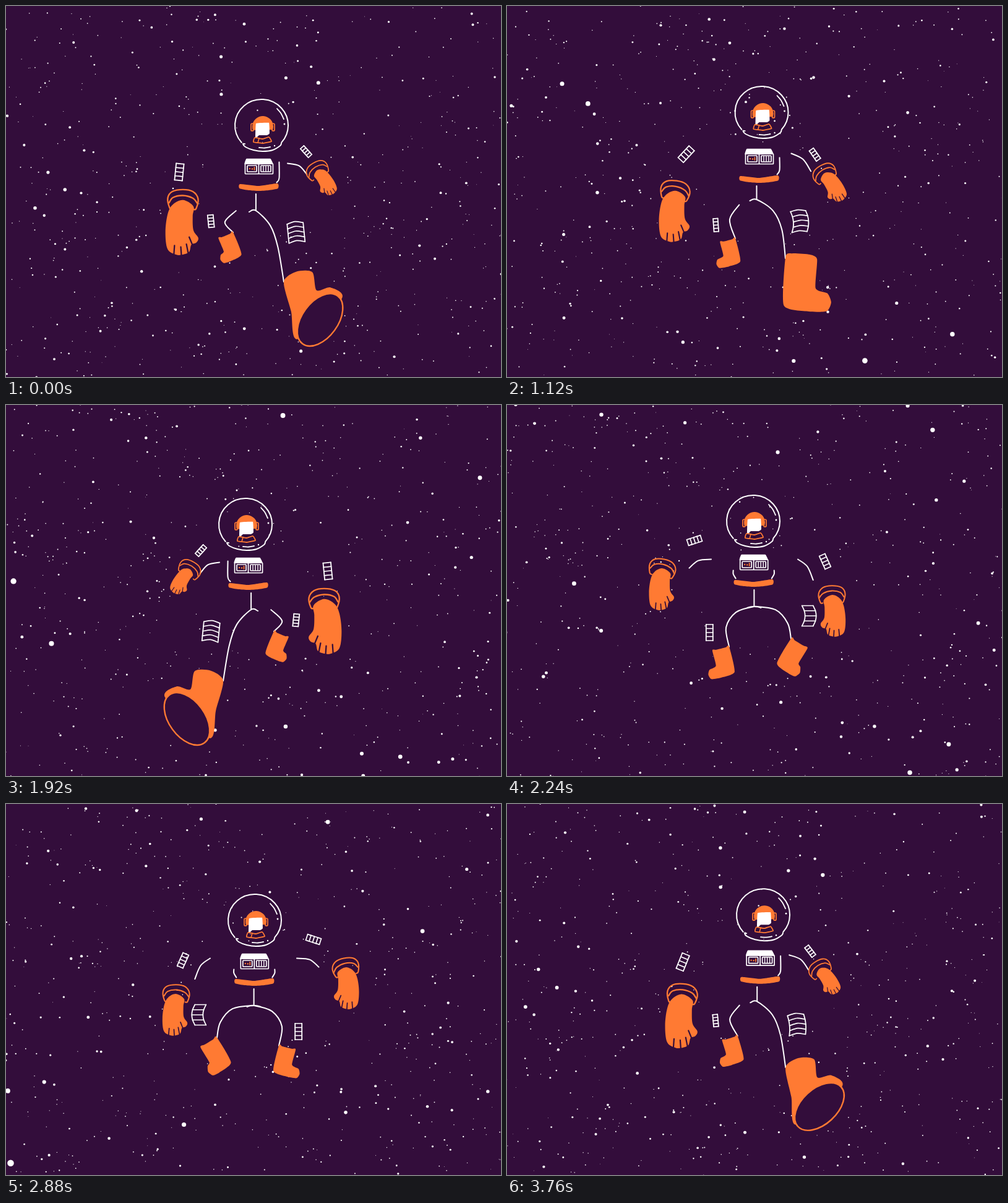
Animation, 800 px wide and 600 px high, one loop 3840 ms. Source, as an HTML page with a canvas:

```html
<!DOCTYPE html>
<html lang="en">
<head>
<meta charset="utf-8">
<title>Space walk</title>
<style>
html, body { margin: 0; width: 100%; height: 100%; overflow: hidden; background: #330d3b; }
canvas { display: block; }
</style>
</head>
<body>
<canvas id="stage" width="800" height="600"></canvas>
<script>
const ctx = document.getElementById('stage').getContext('2d');
const SPACE = '#330d3b', ORANGE = '#ff7a33', WHITE = '#fff';
const STEP = 80, STEPS = 48, CYCLE = 16;

// Motion helpers: one walk cycle lasts 16 phases
const mix = (a, b, t) => a + (b - a) * t;
const angle = phase => phase * 2 * Math.PI / CYCLE;

// Sum of harmonics; pairs are cosine and sine amounts
function wave(phase, mean, ...pairs) {
  const turn = angle(phase);
  return pairs.reduce((sum, amount, i) => {
    const k = Math.floor(i / 2) + 1;
    return sum + amount * (i % 2 ? Math.sin(k * turn) : Math.cos(k * turn));
  }, mean);
}
function bump(phase, centre, width) {
  const gap = Math.abs(phase - centre);
  return Math.exp(-((Math.min(gap, CYCLE - gap) / width) ** 4));
}
const sway = (phase, amount) => 400 + amount * wave(phase, 0, 13.9, .25, 0, 0, -.9, -1.75);
const bob = (phase, y, amount) => wave(phase, y, 0, 0, 2.5, amount);

// Drawing helpers
function curve(points, closed, tension = 1 / 6) {
  const n = points.length;
  const at = i => points[closed ? (i + n) % n : Math.max(0, Math.min(n - 1, i))];
  ctx.beginPath();
  ctx.moveTo(...at(0));
  for (let i = 0; i < (closed ? n : n - 1); i++) {
    const [p, q, r, s] = [at(i - 1), at(i), at(i + 1), at(i + 2)];
    ctx.bezierCurveTo(q[0] + (r[0] - p[0]) * tension, q[1] + (r[1] - p[1]) * tension,
      r[0] - (s[0] - q[0]) * tension, r[1] - (s[1] - q[1]) * tension, r[0], r[1]);
  }
}
function stroke(color, width = 2) {
  ctx.strokeStyle = color;
  ctx.lineWidth = width;
  ctx.stroke();
}
function fill(color) {
  ctx.fillStyle = color;
  ctx.fill();
}
function line(points, color = WHITE, width = 2) {
  curve(points);
  stroke(color, width);
}
function shape(points, color, tension) {
  curve(points, true, tension);
  fill(color);
}
function dot(x, y, r, color = WHITE) {
  ctx.beginPath();
  ctx.arc(x, y, r, 0, 7);
  fill(color);
}
function placed(x, y, turn, scale, draw) {
  ctx.save();
  ctx.translate(x, y);
  ctx.rotate(turn);
  ctx.scale(scale, scale);
  draw();
  ctx.restore();
}

// Stars recede from the camera, so they shrink toward the centre
const NEAR = 6, FAR = NEAR + STEPS;
let seed = 11;
function random() {
  seed = seed + 0x6d2b79f5 | 0;
  let n = Math.imul(seed ^ seed >>> 15, 1 | seed);
  n = n + Math.imul(n ^ n >>> 7, 61 | n) ^ n;
  return ((n ^ n >>> 14) >>> 0) / 4294967296;
}
const stars = Array.from({ length: 1700 }, () => ({
  x: (random() * 2 - 1) * 400 * FAR,
  y: (random() * 2 - 1) * 300 * FAR,
  age: random() * STEPS,
  size: .5 + random() * .6
})).filter(s => Math.abs(s.x) > 4000 || Math.abs(s.y) > 3000);

function drawStars(step) {
  for (const s of stars) {
    const z = NEAR + (s.age + step) % STEPS;
    dot(400 + s.x / z, 300 + s.y / z, (64 / z - .4) * s.size);
  }
}

// Striped patch of four bands
function drawPatch(x, y, turn, w, h, bow = 0, arch = 0) {
  placed(x, y, turn, 1, () => {
    const levels = [0, .25, .5, .75, 1];
    const edge = side => levels.map(t => [side * w / 2 + 4 * t * (1 - t) * bow, (t - .5) * h]);
    const left = edge(-1), right = edge(1);
    left.forEach((p, i) => line([p, [(p[0] + right[i][0]) / 2, p[1] - arch], right[i]], WHITE, 1.7));
    line(left, WHITE, 1.8);
    line(right, WHITE, 1.8);
  });
}

function drawCuff() {
  line([[-16, 13], [-20, 12], [-23, -3], [-15, -14], [0, -17], [16, -14], [23, -4], [20, 11], [16, 13]], ORANGE, 2.2);
  line([[-22, 4], [-15, -4], [0, -8], [15, -5], [21, 3]], ORANGE, 2.2);
}

function drawHand() {
  shape([[-15, 8], [0, -1], [15, 6], [22, 20], [25, 45], [22, 69], [10, 77], [0, 77], [-9, 73],
    [-12, 63], [-19, 60], [-22, 53], [-15, 42], [-14, 22]], ORANGE);
  const gaps = [[12, 64, 13, 78], [3, 66, 2, 80], [-5, 62, -8, 77], [-9, 52, -14, 64]];
  for (const [x1, y1, x2, y2] of gaps) line([[x1, y1], [x2, y2]], SPACE, 2);
}

function drawArm(phase) {
  const forward = wave(phase, 0, 1);
  const wristX = wave(phase, 522.8, -5.1, 9, -14.2, 2.2, -.4, -3);
  const wristY = wave(phase, 288.5, -30.8, -19.1, 2, 3, 6.3, 2.4);
  const size = .86 - .27 * forward;
  const turn = -.55 * bump(phase, 15, 2.2);

  const reach = .45 + .2 * forward;
  if (reach > .35) {
    const x = 470 - 15 * forward, y = bob(phase, 252, 13.5);
    const endX = mix(x, wristX, reach), endY = mix(y, wristY + 16, reach);
    line([[x, y], [(x + endX) / 2 + 3, (y + endY) / 2 - 5], [endX, endY]]);
  }
  drawPatch(wave(phase, 504, -17.5, -8.5, -1.5), wave(phase, 244, -16.5, -17, 8, 4),
    -wave(phase, .63, .32, .42, -.21, -.05), 10 - 2.5 * forward, 23 - 4 * forward);

  const cuffTurn = turn - .2 * Math.max(0, Math.sin(angle(phase)));
  placed(wristX, wristY, cuffTurn, .5 + size / 2, drawCuff);
  placed(wristX, wristY, turn, size, drawHand);
}

function drawBoot(phase, x, y) {
  const size = wave(phase, 60.5, 28.5, -2.5, 11, -4.3);
  const turn = wave(phase, .26, -.28, -.15, -.14, .1);
  const toe = .6 + .3 * (1 - .5 * bump(phase, 10.5, 3));
  const rim = .1 - size * .0023;
  const heelStrike = bump(phase, 15.5, 1) > .5;

  placed(x, y, turn, size, () => {
    if (heelStrike) {
      shape([[0, 0], [.23, -.13], [.48, -.08], [.5, .22], [.73, .21], [.88, .42], [.07, .95], [.04, .49]], ORANGE, .13);
      ctx.beginPath();
      ctx.ellipse(.48, .7, .48, .29, turn * 3 - .3, 0, 7);
      fill(SPACE);
      stroke(ORANGE, 2.4 / size);
    } else {
      shape([[0, -.02], [.12, rim], [.45, rim], [.59, -.02], [.6, .52], [toe - .05, .6], [toe + .03, .76],
        [toe - .04, .93], [.5, .96], [.03, .88]], ORANGE, .1);
    }
  });
}

function drawLeg(phase) {
  const forward = wave(phase, 0, 1);
  const hip = [sway(phase, .3), bob(phase, 328.5, 15.5)];
  const ankle = [wave(phase, 445.5, 4.1, -11.1, -4.5, 5, 3.9, -2.1), wave(phase, 395.3, 42.5, 14.4, 10.8, 3.3, -2.5, 7.9)];
  // A shorter leg bends further outward
  const bend = 45 - .26 * Math.hypot(ankle[0] - hip[0], ankle[1] - hip[1]);
  const knee = [(hip[0] + ankle[0]) / 2 + bend, (hip[1] + ankle[1]) / 2 + 1];
  const thigh = [mix(hip[0], knee[0], .6) + 2, mix(hip[1], knee[1], .6) - 11];
  const start = forward < -.5 ? [] : [[hip[0] - 11, hip[1] + 2], hip];
  line([...start, thigh, knee, ankle]);

  drawPatch(wave(phase, 474, 0, -6.5, -5.2, 7), wave(phase, 356, 9.5, 13.5, 1.5, 4.5), -.1 * forward,
    wave(phase, 16, 8.5, -3.5, 1.5), wave(phase, 27.5, 5.5, -3.5, -2),
    5 * Math.max(0, -Math.sin(angle(phase))), 3 * Math.max(0, forward));
  drawBoot(phase, ...ankle);
}

function drawSide(phase) {
  const height = 6 + 20 * wave(phase, 0, 1);
  if (height > 0) {
    const x = sway(phase, .65) + 29, y = bob(phase, 283, 10.5);
    line([[x + 4, y - 7 - height], [x + 4, y - 7], [x, y]]);
  }
  drawLeg(phase);
  drawArm(phase);
}

function drawHead() {
  ctx.beginPath();
  ctx.ellipse(0, 0, 43, 42, 0, 2.42, .72 + 2 * Math.PI);
  stroke(WHITE);
  line([[-27, 30], [-30, 30], [-26, 35], [-13, 40], [2, 42], [18, 40], [30, 33], [32, 29]]);
  line([[25, -27], [31, -20], [36, -10]], WHITE, 1.8);
  line([[-4, 36], [5, 36.5], [14, 35]], WHITE, 1.8);
  dot(37, -2, 1.4);
  dot(21, 33, 1.2);

  ctx.beginPath();
  ctx.ellipse(2, 2, 17, 17, 0, 2.8, .3 + 2 * Math.PI);
  fill(ORANGE);
  for (const x of [-17, 17]) {
    ctx.beginPath();
    ctx.roundRect(x, -3, 4, 12, 2);
    stroke(ORANGE, 1.7);
  }
  shape([[-9, -3], [12, -4], [13, 13], [9, 16], [-4, 16], [-8, 20], [-10, 20]], WHITE, .03);
  curve([[-11, 20], [2, 22], [12, 19], [16, 26], [2, 29], [-13, 27]], true, .06);
  stroke(ORANGE, 1.8);
  line([[-4, 21], [-6, 28]], ORANGE, 1.6);
}

function drawBox() {
  shape([[3, 0], [42, 0], [46, 9], [0, 9]], WHITE, .02);
  ctx.beginPath();
  ctx.roundRect(1, 8, 45, 16.5, 1);
  ctx.roundRect(4.5, 11, 15, 10, 1);
  ctx.roundRect(26.5, 11, 16, 10, 1);
  stroke(WHITE, 1.7);
  line([[23, 8], [23, 24]], WHITE, 1.8);
  dot(8.5, 16, 1.2, ORANGE);
  dot(12.5, 16.5, 1.2, ORANGE);
  line([[16, 14], [16, 18]], ORANGE, 1.8);
  for (let x = 30.5; x < 40; x += 4) line([[x, 12], [x, 20]], WHITE, 1.4);
}

function drawBody(phase) {
  const beltY = bob(phase, 288.5, 10.5), spineX = sway(phase, .3);
  line([[spineX, beltY + 13], [spineX, bob(phase, 328.5, 15.5)]]);
  placed(sway(phase, .65), beltY, 0, 1, () => {
    shape([[-30, -3], [0, 0], [30, -4], [31, 4], [16, 7], [0, 8], [-16, 7], [-31, 4]], ORANGE, .1);
  });
  placed(sway(phase, .65) - 23, bob(phase, 244.5, 13.5), 0, 1, drawBox);
  placed(sway(phase, 1), bob(phase, 190.5, 18.5), 0, 1, drawHead);
}

function draw() {
  const step = Math.floor(performance.now() / STEP) % STEPS;
  const phase = step % CYCLE;
  ctx.fillStyle = SPACE;
  ctx.fillRect(0, 0, 800, 600);
  ctx.lineCap = ctx.lineJoin = 'round';
  drawStars(step);
  drawBody(phase);
  drawSide(phase);
  // The other side is the mirror image half a cycle later
  ctx.save();
  ctx.translate(800, 0);
  ctx.scale(-1, 1);
  drawSide((phase + CYCLE / 2) % CYCLE);
  ctx.restore();
  requestAnimationFrame(draw);
}
draw();
</script>
</body>
</html>
```
